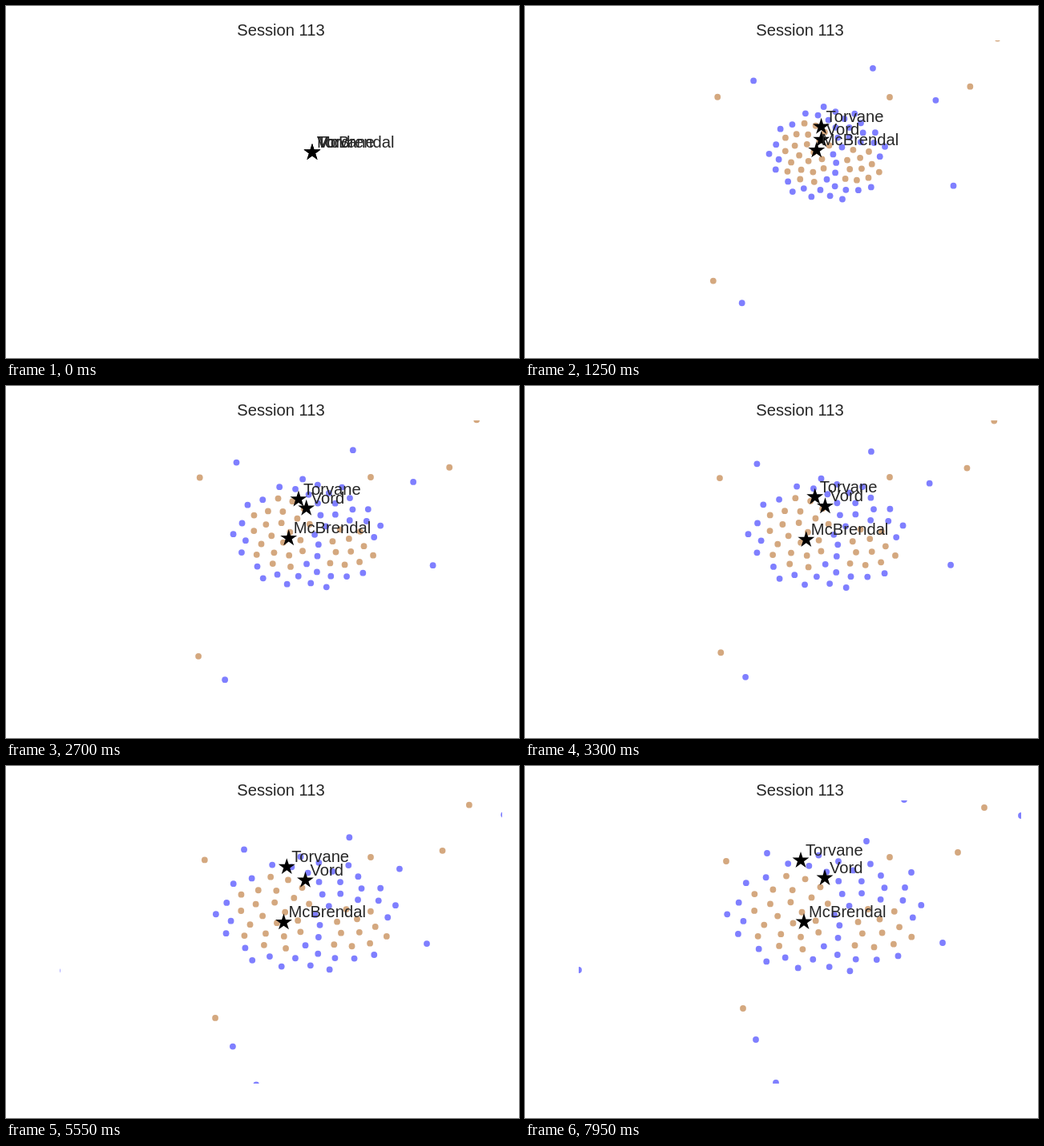
Animation, 640 px wide and 440 px high, one loop 8 s. Source, as an HTML page with a canvas:

```html
<!DOCTYPE html>
<html lang="en">
<head>
<meta charset="utf-8">
<title>Session 113</title>
<style>
  html, body { margin: 0; width: 640px; height: 440px; overflow: hidden; background: #fff; }
  canvas { display: block; }
</style>
</head>
<body>
<canvas id="stage" width="640" height="440"></canvas>
<script>
const ctx = document.getElementById('stage').getContext('2d');
const LOOP = 8000, STEP = 50;
const ORIGIN = [382, 183];
const BLUE = 'rgba(0, 0, 255, 0.5)', BROWN = 'rgba(170, 82, 0, 0.5)';
const CROWD_SIZE = 73, GOLDEN_ANGLE = Math.PI * (3 - Math.sqrt(5));

// All motion is interpolated between values at these times.
const KEY_TIMES = [50, 750, 1950, 4550, 6450, 7950];
const crowdRadii = [[0, 0], [64, 54], [88, 70], [109, 73], [120, 75], [124, 76]];
// Share of the full distance, and of the slack that strays still have to give up.
const strayReach = [[0, 1], [1, 1], [1, 1], [1, 0.51], [1, 0.1], [1, 0]];

const stars = [
  { name: 'Torvane', path: [ORIGIN, [370, 155], [369, 145], [355, 133], [346, 120], [344, 118]] },
  { name: 'Vord', path: [ORIGIN, [366, 175], [375, 156], [374, 145], [373, 141], [374, 140]] },
  { name: 'McBrendal', path: [ORIGIN, [370, 175], [355, 188], [347, 196], [346, 195], [348, 195]] }
];

// Resting x and y, and how much further out the dot is thrown at first.
const strays = [
  { color: BLUE, spots: [
    [473, 42, 14], [619, 62, 8], [313, 396, 9], [67, 255, 11], [426, 94, 18],
    [302, 109, 23], [482, 133, 34], [521, 221, 14], [288, 342, 34]
  ] },
  { color: BROWN, spots: [
    [251, 119, 12], [455, 114, 0], [540, 108, 17], [573, 52, 20], [272, 303, 55]
  ] }
];

function keyed(values, t) {
  let i = 0;
  while (i < KEY_TIMES.length - 2 && t > KEY_TIMES[i + 1]) i++;
  let k = (t - KEY_TIMES[i]) / (KEY_TIMES[i + 1] - KEY_TIMES[i]);
  k = Math.max(0, Math.min(1, k));
  if (i === 0) k = 1 - (1 - k) ** 2;
  return values[i].map((v, n) => v + (values[i + 1][n] - v) * k);
}

const inEllipse = (x, y, cx, cy, rx, ry) => ((x - cx) / rx) ** 2 + ((y - cy) / ry) ** 2 < 1;

// Evenly packed spiral in a unit disc, with one brown group left and one lower right.
const crowd = Array.from({ length: CROWD_SIZE }, (_, i) => {
  const r = Math.sqrt((i + 0.5) / CROWD_SIZE), a = i * GOLDEN_ANGLE;
  const x = r * Math.cos(a), y = r * Math.sin(a);
  const brown = inEllipse(x, y, -0.38, 0, 0.45, 0.7) || inEllipse(x, y, 0.54, 0.25, 0.38, 0.4);
  return { x: x - 0.05, y: y + 0.04, color: brown ? BROWN : BLUE };
});

function drawDot(x, y, color) {
  ctx.fillStyle = color;
  ctx.beginPath();
  ctx.arc(x, y, 3.9, 0, 2 * Math.PI);
  ctx.fill();
}

function drawCrowd(t) {
  const [rx, ry] = keyed(crowdRadii, t);
  for (const { x, y, color } of crowd) {
    drawDot(ORIGIN[0] + x * rx, ORIGIN[1] + y * ry, color);
  }
}

function drawStrays(t) {
  const [reach, loose] = keyed(strayReach, t);
  for (const { color, spots } of strays) {
    for (const [x, y, slack] of spots) {
      const dx = x - ORIGIN[0], dy = y - ORIGIN[1];
      const scale = reach * (1 + slack * loose / Math.hypot(dx, dy));
      drawDot(ORIGIN[0] + dx * scale, ORIGIN[1] + dy * scale, color);
    }
  }
}

function drawStar([x, y]) {
  ctx.fillStyle = '#000';
  ctx.beginPath();
  for (let i = 0; i < 10; i++) {
    const r = i % 2 ? 4.2 : 11, a = i * Math.PI / 5;
    ctx.lineTo(x + r * Math.sin(a), y - r * Math.cos(a));
  }
  ctx.fill();
}

function draw(t) {
  ctx.fillStyle = '#fff';
  ctx.fillRect(0, 0, 640, 440);

  ctx.save();
  ctx.beginPath();
  ctx.rect(67, 43, 552, 354);
  ctx.clip();
  drawCrowd(t);
  drawStrays(t);
  ctx.restore();

  const spots = stars.map(({ path }) => keyed(path, t));
  spots.forEach(drawStar);

  ctx.fillStyle = '#262626';
  ctx.font = '20.2px "Liberation Sans", Arial, sans-serif';
  ctx.textAlign = 'center';
  ctx.fillText('Session 113', 343, 37);
  ctx.textAlign = 'left';
  stars.forEach(({ name }, n) => ctx.fillText(name, spots[n][0] + 6, spots[n][1] - 6));
}

const start = performance.now();
function tick() {
  const t = (performance.now() - start) % LOOP;
  draw(Math.floor(t / STEP) * STEP);
  requestAnimationFrame(tick);
}
tick();
</script>
</body>
</html>
```
